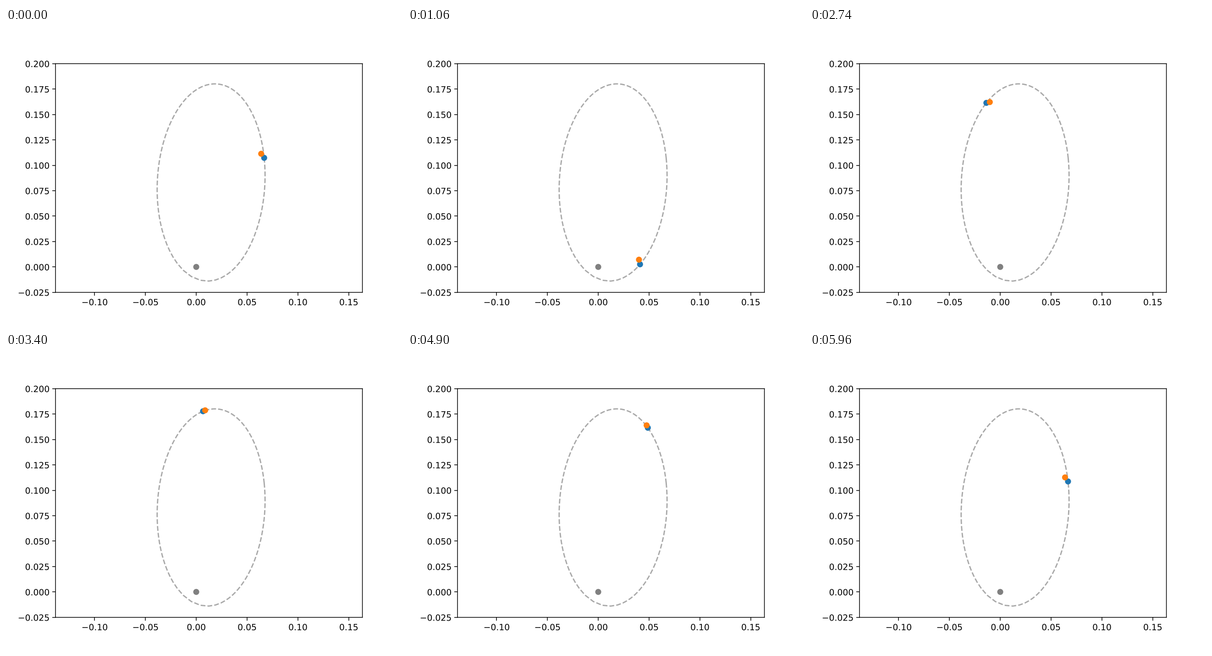
These frames come from a looping animation (864x648 px, 5980 ms). A matplotlib script:

```python
import numpy as np
import matplotlib.pyplot as plt
from matplotlib.animation import FuncAnimation
from matplotlib.patches import Circle
from matplotlib.patheffects import Normal

FRAMES = 299
A = 0.1246                       # semi-major axis
INC, NODE, PERI = np.radians([134.87, 226.53, 64.98])
M0 = -1.296                      # mean anomaly at the start
PER_INCH = 0.225 / (4.8 * 0.77)  # data units per inch, both axes

plt.rcParams["path.snap"] = False


def sky_path(ecc, mean):
    """Projected Kepler orbit for an array of mean anomalies."""
    mean = (mean + np.pi) % (2 * np.pi) - np.pi
    lo, hi = np.full_like(mean, -np.pi), np.full_like(mean, np.pi)
    for _ in range(50):
        mid = (lo + hi) / 2
        below = mid - ecc * np.sin(mid) < mean
        lo, hi = np.where(below, mid, lo), np.where(below, hi, mid)
    E = (lo + hi) / 2
    u = A * (np.cos(E) - ecc)
    v = A * np.sqrt(1 - ecc**2) * np.sin(E)

    cn, sn = np.cos(NODE), np.sin(NODE)
    cp, sp = np.cos(PERI), np.sin(PERI)
    ci = np.cos(INC)
    north = u * (cn * cp - sn * sp * ci) - v * (cn * sp + sn * cp * ci)
    east = u * (sn * cp + cn * sp * ci) + v * (cn * cp * ci - sn * sp)
    return -east, north


def dot(color):
    """Round body placed with sub-pixel precision."""
    return ax.add_patch(Circle((0, 0), 3.5 / 72 * PER_INCH,
                               fc=color, lw=0, zorder=3))


mean = M0 + 2 * np.pi * np.arange(FRAMES + 1) / FRAMES
x1, y1 = sky_path(0.8831, mean)
x2, y2 = sky_path(0.9, mean)

fig, ax = plt.subplots(figsize=(6.4, 4.8), dpi=135)
ax.plot(x1, y1, "--", color="darkgray")
dot("gray")
dot1, dot2 = dot("tab:blue"), dot("tab:orange")

half = 6.4 * 0.775 * PER_INCH / 2
ax.set_xlim(0.0125 - half, 0.0125 + half)
ax.set_ylim(-0.025, 0.2)
# outline rendering keeps the labels free of pixel hinting
plt.setp(ax.get_xticklabels() + ax.get_yticklabels(),
         path_effects=[Normal()])


def update(i):
    dot1.center = x1[i], y1[i]
    dot2.center = x2[i], y2[i]
    return dot1, dot2


anim = FuncAnimation(fig, update, frames=FRAMES, interval=20,
                     repeat=True, repeat_delay=0, blit=True)
plt.show()
```
